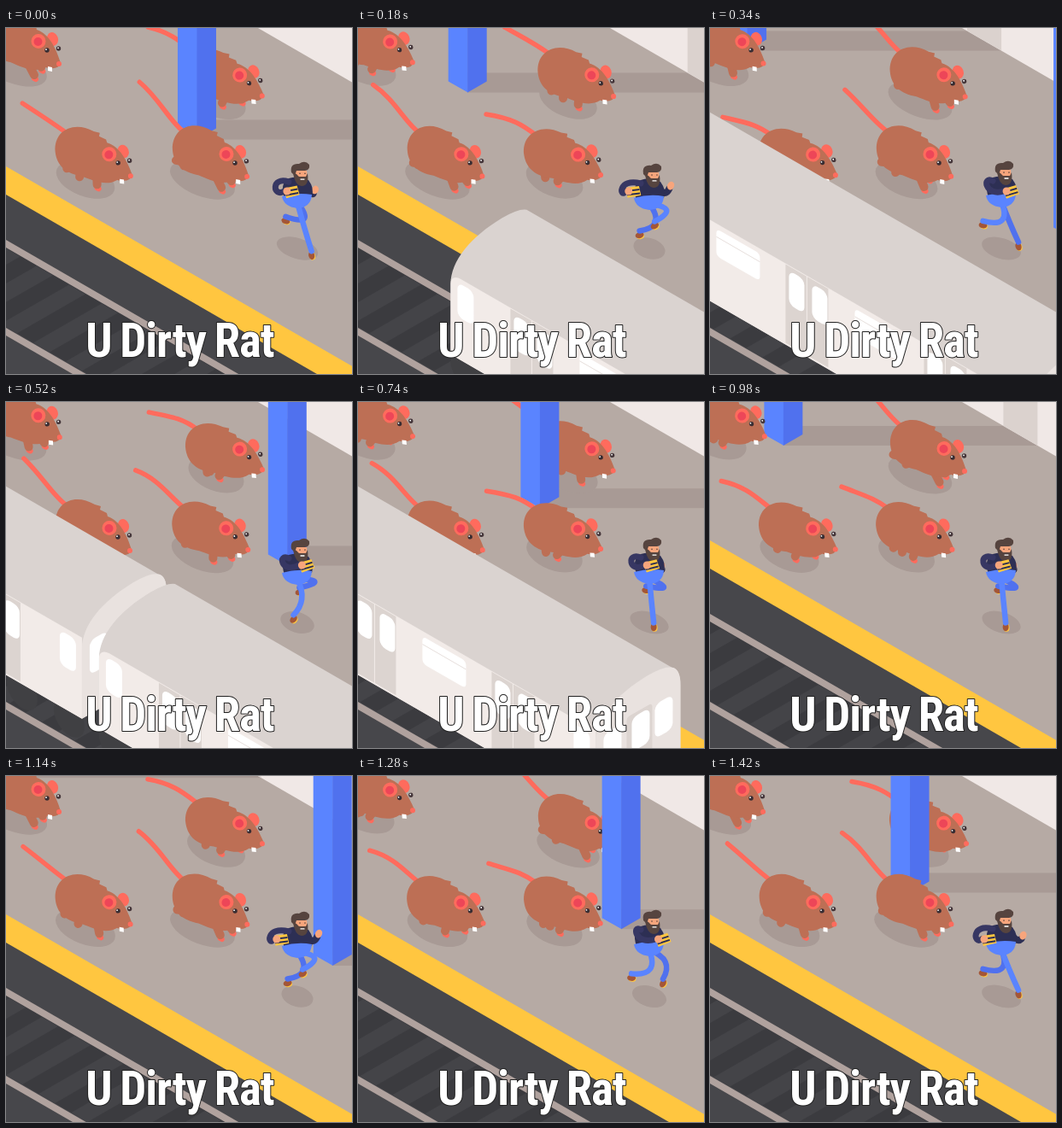
An HTML page with a canvas for the animation above (1440 ms loop, 405x405 px).

```html
<!DOCTYPE html>
<html lang="en">
<head>
<meta charset="utf-8">
<title>U Dirty Rat</title>
<style>
html, body { margin: 0; width: 100%; height: 100%; overflow: hidden; background: #b6aaa4 }
canvas { display: block }
</style>
</head>
<body>
<canvas id="stage" width="405" height="405"></canvas>
<script>
const ctx = document.getElementById('stage').getContext('2d');
const LOOP = 1440, K = 0.577;          // K: slope of the isometric axes
const PILLAR_GAP = 381, SCROLL = PILLAR_GAP / 720, TRAIN_SPEED = 1.575;
const CAR = 516, COUPLING = 20, DOOR_GAP = 162, EAVES = 221.5;
const BROWN = '#bd6f55', PINK = '#ff6b5d', SHADE = '#a89a95';
const BLUE = '#5a84ff', NAVY = '#2d2f54', SKIN = '#f7a57c', HAIR = '#56443f';

const wave = (t, period, shift = 0) => Math.cos(2 * Math.PI * (t + shift) / period);
const mod = (a, n) => ((a % n) + n) % n;

function poly(color, ...p) {
  ctx.fillStyle = color;
  ctx.beginPath();
  for (let i = 0; i < p.length; i += 2) ctx.lineTo(p[i], p[i + 1]);
  ctx.fill();
}
function oval(color, x, y, rx, ry = rx, turn = 0) {
  ctx.fillStyle = color;
  ctx.beginPath();
  ctx.ellipse(x, y, rx, ry, turn, 0, 7);
  ctx.fill();
}
function shape(color, d) {
  ctx.fillStyle = color;
  ctx.fill(new Path2D(d));
}
function line(color, width, d) {
  ctx.strokeStyle = color;
  ctx.lineWidth = width;
  ctx.lineCap = ctx.lineJoin = 'round';
  ctx.stroke(new Path2D(d));
}
function pane(x, y, w, h, color = '#fff', r = 7) {
  ctx.fillStyle = color;
  ctx.beginPath();
  ctx.roundRect(x, y, w, h, r);
  ctx.fill();
}
// Band parallel to the track between two heights at the left border
const band = (color, top, bottom) =>
  poly(color, 0, top, 405, top + 405 * K, 405, bottom + 405 * K, 0, bottom);

function tracks(t) {
  band('#47474b', 194, 700);
  band('#3b3b3f', 257, 350);
  const step = PILLAR_GAP / 10;
  for (let x = -120 - mod(t * SCROLL, step); x < 300; x += step) {
    const y = 350 + K * x;
    poly('#444448', x, y, x + 80, y - 46, x + 99, y - 35, x + 19, y + 11);
  }
  band('#b0a29e', 248, 257);
  band('#b0a29e', 351, 360);
  band('#ffc640', 162, 195);
}

function eachPillar(t, draw) {
  const first = mod(201.5 - t * SCROLL, PILLAR_GAP);
  for (let i = -1; i < 3; i++) {
    const x = first + i * PILLAR_GAP;
    draw(x, 51 + (x - 63.4) * K);
  }
}
function pillarShade(x, y) {
  poly(SHADE, x + 22, y - 23, 800, y - 23, 800, y, x + 22, y);
}
function wall(t) {
  poly('#f0e8e6', 295, 0, 405, 0, 405, 63.5);
  eachPillar(t, (x, y) => {
    const right = 295 + y / K, left = right - 40;
    poly('#dbd2ce', left, 0, right, 0, right, y, left, y - 23);
  });
}
function pillar(x, y) {
  poly(BLUE, x, -9, x + 23, -9, x + 23, y, x, y - 13);
  poly('#5071ee', x + 22.5, -9, x + 45, -9, x + 45, y - 13, x + 22.5, y);
}

function ratShadow(t) {
  oval(SHADE, 230, 178, 37 + 3 * wave(t, 288), 19, 0.36);
}
function rat(t) {
  const c = wave(t, 288, -20), lead = wave(t, 288, 25);
  const gather = (1 - wave(t, 288, -25)) / 2;    // 0 stretched, 1 crouched
  const tipX = 154 + 4 * wave(t, 288, -45), tipY = 84 - 21 * wave(t, 288, -8);
  const limbs = [
    [218, 158, 209 - 11 * c, 169 - 11 * c],
    [225, 162, 216 - 9 * lead, 172 - 8 * lead],
    [256, 168, 257 + 8 * lead, 179 + 5 * lead],
    [243, 168, 243 + 10 * c, 187 + 4 * c]
  ];
  line(PINK, 5.5, `M209 ${122 + 4 * gather}C192 ${110 + 3 * gather} 180 ${97 - 14 * wave(t, 288, 5)} ${tipX} ${tipY}`);
  limbs.forEach(([x, y, fx, fy], i) => {
    if (i > 1) line(PINK, 6, `M${fx} ${fy}l2 1`);
    line(BROWN, 10, `M${x} ${y}L${fx} ${fy - 4}`);
  });
  // The rump sinks around the steady head
  ctx.save();
  ctx.translate(264, 152);
  ctx.rotate(-0.1 * gather);
  ctx.translate(-264, -152);
  oval(PINK, 274.5, 145, 6.5, 8, -0.3);
  oval('#45363a', 281.5, 156, 2.7);
  shape(BROWN, 'M195 142C194 117 218 106 241 120L248 122 247 126 255 130 256 134' +
    'C271 139 279 157 284 173Q281 182 266 178C253 185 239 178 225 172C206 168 196 158 195 142');
  shape('#fff', 'M269 177l5 1 0 5-5-1z');
  oval(PINK, 258, 147.5, 8.5);
  oval('#ed4658', 257.5, 148, 5);
  oval('#382d32', 268, 158, 2.7);
  oval('#fff', 267, 157.2, 0.9);
  oval('#fff', 281, 155.3, 0.9);
  oval(PINK, 282, 174, 3);
  ctx.restore();
}
function at(x, y, draw, t) {
  ctx.save();
  ctx.translate(x, y);
  draw(t);
  ctx.restore();
}

// Positions of one foot through a full stride, evenly spaced in time
const STRIDE = [[358, 266], [341, 260], [330, 243], [318, 234], [327, 226], [341, 220], [347, 231], [360, 248]];
function footAt(t) {
  const u = mod(t / 30, 8), i = Math.floor(u), f = u - i;
  const [a, b, c, d] = [7, 0, 1, 2].map(k => STRIDE[(i + k) % 8]);
  return [0, 1].map(k => b[k] + f / 2 * (c[k] - a[k] +
    f * (2 * a[k] - 5 * b[k] + 4 * c[k] - d[k] + f * (3 * (b[k] - c[k]) + d[k] - a[k]))));
}
function leg(t, color, hipY) {
  const hipX = 341, [x, y] = footAt(t);
  const dx = x - hipX, dy = y - hipY, len = Math.hypot(dx, dy);
  const bend = 1.6 * Math.sqrt(Math.max(0, 25.5 ** 2 - len ** 2 / 4)) / len;
  const kneeX = (hipX + x) / 2 + dy * bend, kneeY = (hipY + y) / 2 - dx * bend;
  const turn = Math.atan2(y - kneeY, x - kneeX) - 1.5;
  oval('#ffc640', x + 1, y + 1, 3.5, 4.5, turn);
  oval('#a35638', x, y, 3.5, 5, turn);
  line(color, 6.5, `M${hipX} ${hipY}Q${kneeX} ${kneeY} ${x} ${y - 5}`);
}
function man(t) {
  const bob = 2 * wave(t, 120, -40);
  const swing = wave(t, 240, -72), bookX = 339 + 18 * swing, bookY = 192 - bob;
  const handX = 355 - 13 * wave(t, 240, -82), handY = 186 + 5 * wave(t, 240, -20);
  oval(SHADE, 341, 258, 22 + 3 * wave(t, 120), 12, 0.3);
  leg(t + 120, '#5071ee', 205 + bob);
  leg(t, BLUE, 205 + bob);
  ctx.save();
  ctx.translate(0, bob);
  line(NAVY, 8, `M350 184Q359 198 ${handX - 2} ${handY + 4}`);
  oval(SKIN, handX, handY, 4, 5, 0.4);
  shape(NAVY, 'M331 177Q342 173 354 179Q361 188 358 198L326 200Q320 183 331 177');
  shape(BLUE, 'M323 198Q341 193 358 196Q357 211 341 212Q325 210 323 198');
  shape(SKIN, 'M338 168h14l1 11-13 2z');
  shape(HAIR, 'M336 170l4 2 3 3 8 0 2-4Q355 186 346 186Q338 185 336 170');
  shape(HAIR, 'M334 170Q332 159 343 160Q350 155 355 161Q356 167 350 168L340 168 338 174z');
  line('#fff', 1.3, 'M345 178h4');
  line('#453633', 1.3, 'M344 171v.3M350 171v.3');
  ctx.save();
  ctx.translate(bookX, bookY);
  ctx.rotate(-0.22 - 0.1 * swing);
  poly('#ffc640', -8, -6, 8, -6, 9, 5, -7, 6);
  poly(NAVY, -8, -3, 8, -3, 8, -1, -8, -1);
  poly(NAVY, -7, 1.5, 8, 1.5, 8, 3.5, -7, 3.5);
  ctx.restore();
  const elbow = 311 + 9 * (1 + swing);
  line('#373763', 7, `M331 181C${elbow - 8} 174 ${elbow - 5} 200 ${bookX - 8} ${bookY - 1}`);
  oval(SKIN, bookX - 5, bookY - 1, 4.5);
  ctx.restore();
}

const frame = (x, slope) => ctx.setTransform(1, slope, 0, 1, x, EAVES + K * x);
// Arched outline of a carriage end, up to and beyond its highest point
function archUp() {
  ctx.moveTo(0, 98);
  ctx.lineTo(0, 16);
  ctx.bezierCurveTo(0, -12, 24, -26, 60, -27);
  ctx.quadraticCurveTo(80, -27, 89, -20);
}
function archDown() {
  ctx.quadraticCurveTo(99, -13, 99, 6);
  ctx.lineTo(99, 98);
  ctx.lineTo(0, 98);
  ctx.fill();
}
function carriage(start) {
  const end = start + CAR;
  frame(start, K);
  for (const x of [18, 73, CAR - 70, CAR - 15]) oval('#404043', x, 106, 18, 20);

  ctx.fillStyle = '#dad3d0';
  ctx.beginPath();
  frame(start, -K);
  archUp();
  frame(end, -K);
  ctx.lineTo(89, -20);
  archDown();

  frame(start, K);
  pane(0, 3, CAR, 95, '#f2ebe8', [12, 0, 0, 0]);
  for (let i = 0; i < 3; i++) {
    const x = 70 + i * DOOR_GAP;
    pane(x, 4, 24.5, 92, '#dcd4d0', 0);
    pane(x + 25.5, 4, 24.5, 92, '#dcd4d0', 0);
    pane(x + 4, 9, 18, 40);
    pane(x + 31, 9, 18, 40);
    if (i < 2) {
      pane(x + 81, 9, 51, 32, '#fff', 5);
      pane(x + 81, 18, 51, 1, '#e6dedb', 0);
    }
  }
  pane(8, 9, 19, 40);
  pane(CAR - 26, 9, 19, 40);

  frame(end, -K);
  ctx.fillStyle = '#e9e2df';
  ctx.beginPath();
  archUp();
  archDown();
  pane(36, 8, 30, 90, '#dcd4d0', 4);
  for (const x of [9, 42, 69]) pane(x, 12, 21, 40);
  ctx.setTransform(1, 0, 0, 1, 0, 0);
}
function train(t) {
  const end = 90.5 - (t - 520) * TRAIN_SPEED;
  carriage(end - CAR);
  carriage(end + COUPLING);
}

function caption() {
  const text = 'U Dirty Rat';
  const font = size => `900 condensed ${size}px Impact, "Roboto Condensed", Roboto, sans-serif`;
  ctx.letterSpacing = '-1px';
  ctx.wordSpacing = '-2px';
  ctx.font = font(50);
  const size = Math.min(56, 50 * 219 / ctx.measureText(text).width);
  ctx.font = font(size);
  ctx.textAlign = 'center';
  ctx.lineWidth = 2;
  ctx.lineJoin = 'round';
  ctx.strokeStyle = '#222';
  ctx.fillStyle = '#fff';
  const y = 365 + size * 0.36;
  ctx.strokeText(text, 203.5, y);
  ctx.fillText(text, 203.5, y);
}

function draw(now) {
  const t = now % LOOP;
  ctx.fillStyle = '#b6aaa4';
  ctx.fillRect(0, 0, 405, 405);
  eachPillar(t, pillarShade);
  wall(t);
  tracks(t);
  const rats = [[16, -93, t - 83], [-220, -132, t + 20], [0, 0, t], [-137, 0, t + 88]];
  for (const [x, y, time] of rats) at(x, y, ratShadow, time);
  rats.forEach(([x, y, time], i) => {
    at(x, y, rat, time);
    if (i === 0) eachPillar(t, pillar);
  });
  man(t);
  train(t);
  caption();
  requestAnimationFrame(() => draw(performance.now()));
}
draw(0);
</script>
</body>
</html>
```
